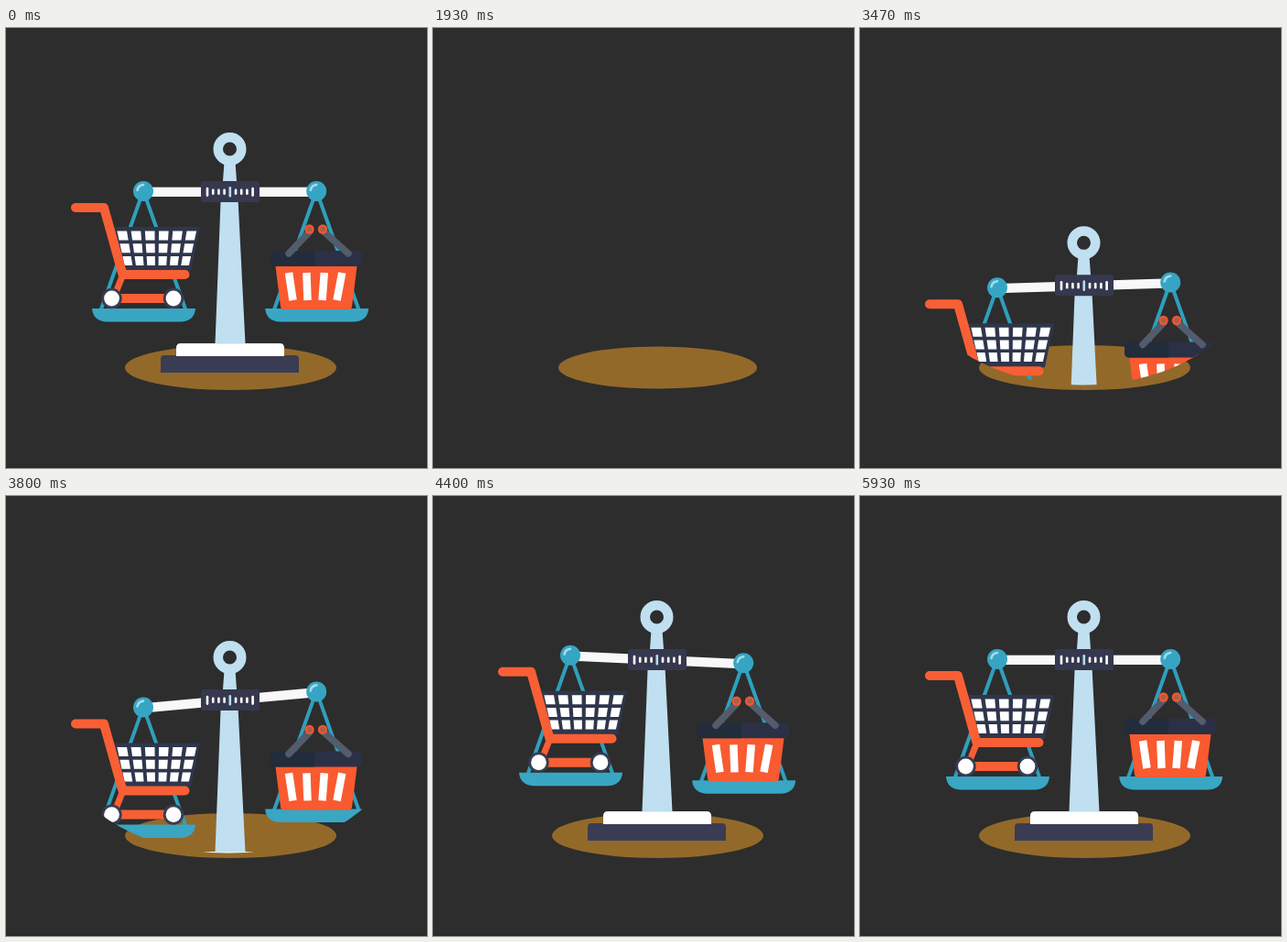
Write an HTML page that moves like this. It is 460x480 px and loops after 6.07 s.

```html
<!DOCTYPE html>
<html lang="en">
<head>
<meta charset="utf-8">
<title>Balance scale</title>
<style>
  html, body { margin: 0; width: 100%; height: 100%; overflow: hidden; background: #2d2d2d; }
  svg { display: block; width: 460px; height: 480px; }
</style>
</head>
<body>
<svg viewBox="0 0 460 480">
  <defs>
    <clipPath id="floor"><path d="M57 0V264.600A186 125 0 0 0 429 264.600V0Z"/></clipPath>
    <g id="hanger">
      <path d="M147 186L103.500 308M153 186L196.500 308" stroke="#2f9fbc" stroke-width="4"/>
      <path d="M94 306H207Q206 320 190 320.500H111Q95 320 94 306Z" fill="#39a6c4"/>
      <circle cx="150" cy="178" r="11" fill="#36a5c3"/>
      <path d="M143.500 177Q144.500 171.500 150 171" fill="none" stroke="#a5dbe8" stroke-width="2.600" stroke-linecap="round"/>
    </g>
    <g id="wheel">
      <circle r="11.200" fill="#383c52"/>
      <circle r="8.400" fill="#fff"/>
    </g>
    <g id="rivet">
      <circle r="5.200" fill="#f0562f"/>
      <circle r="2.800" fill="#a5604f"/>
    </g>
  </defs>

  <rect width="460" height="480" fill="#2d2d2d"/>
  <rect y="478" width="460" height="2" fill="#30272b"/>
  <ellipse id="shadow" cx="245.500" cy="370.500" fill="#93692a"/>

  <g clip-path="url(#floor)">
    <g id="scale">
      <path d="M169 376V361Q169 357 173 357H316Q320 357 320 361V376Z" fill="#3a3c54"/>
      <path d="M186 358V349Q186 344 191 344H299Q304 344 304 349V358Z" fill="#fff"/>
      <g fill="#c0dff0">
        <path d="M238.500 146H250.500L252 167L253.700 190L261.500 344.500H228.500L234.500 190L237 167Z"/>
        <circle cx="244.500" cy="132" r="12.750" fill="none" stroke="#c0dff0" stroke-width="10.500"/>
      </g>
      <rect id="beam" x="158" y="173.700" width="174" height="10.300" fill="#f8f8fa"/>
      <rect x="213" y="167" width="64" height="23" rx="2.500" fill="#36384f"/>
      <g id="ticks" stroke-width="2.600" stroke-linecap="round"></g>

      <g id="left">
        <use href="#hanger"/>
        <path d="M117 217H212L202 265H129Z" fill="#2f364c"/>
        <g id="cells" fill="#fff"></g>
        <path d="M127 271L119 291" stroke="#f95f35" stroke-width="7"/>
        <path d="M76 196H107L127.500 269H195.500" fill="none" stroke="#f95f35" stroke-width="10" stroke-linecap="round" stroke-linejoin="round"/>
        <path d="M122 295H178" stroke="#f95f35" stroke-width="10"/>
        <use href="#wheel" x="115.500" y="295"/>
        <use href="#wheel" x="183" y="295"/>
      </g>

      <g id="right">
        <use href="#hanger" x="189.200"/>
        <path d="M294 256H384L378 304Q377.500 307 374 307H304Q300.500 307 300 304Z" fill="#f95a30"/>
        <g id="slots" stroke="#fff" stroke-width="8.500"></g>
        <rect x="289" y="243" width="100" height="17" rx="5" fill="#2b3046"/>
        <path d="M337 243H294Q289 243 289 248V255Q289 260 294 260H337Z" fill="#222c3a"/>
        <path d="M309 246L332 222M374 246L347 222" stroke="#525c6b" stroke-width="7.500" stroke-linecap="round"/>
        <use href="#rivet" x="331.500" y="219.500"/>
        <use href="#rivet" x="346" y="219.500"/>
      </g>
    </g>
  </g>
</svg>
<script>
  const LOOP = 6070, STEP = 200 / 3;
  const $ = id => document.getElementById(id);

  function add(parent, tag, attrs) {
    const el = document.createElementNS('http://www.w3.org/2000/svg', tag);
    for (const key in attrs) el.setAttribute(key, attrs[key]);
    $(parent).append(el);
  }

  // Gauge marks: tall at both ends and in the middle
  for (let i = 0; i < 9; i++) {
    const x = 220 + i * 6.2;
    const half = i === 4 ? 4.5 : i % 8 === 0 ? 3.8 : 2;
    add('ticks', 'path', {
      d: `M${x} ${178.8 - half}V${178.8 + half}`,
      stroke: i === 4 ? '#b5dcee' : '#fff'
    });
  }

  // Cart mesh: six tapering columns in three rows
  const meshX = (u, y) => {
    const a = 121.5 + (y - 222) * 0.22, b = 208 - (y - 222) * 0.22;
    return a + (b - a) * u;
  };
  for (let row = 0; row < 3; row++) {
    const top = 221.5 + row * 13.7, bottom = top + 10;
    for (let col = 0; col < 6; col++) {
      const u = col / 5.7, v = u + 0.7 / 5.7;
      add('cells', 'path', {
        d: `M${meshX(u, top)} ${top}H${meshX(v, top)}L${meshX(v, bottom)} ${bottom}H${meshX(u, bottom)}Z`
      });
    }
  }

  for (let i = 0; i < 4; i++) {
    add('slots', 'path', { d: `M${309 + i * 19.4} 267L${313.5 + i * 16} 297` });
  }

  // Time in ms, tilt in degrees (positive lowers the right side)
  const SWING = [[2350, -4], [3050, 4.8], [3750, -5.3], [4450, 2.7], [5070, -1.5], [5670, 0]];

  function tiltAt(t) {
    if (t <= SWING[0][0]) return SWING[0][1];
    for (let i = 1; i < SWING.length; i++) {
      const [t0, a] = SWING[i - 1], [t1, b] = SWING[i];
      if (t < t1) return a + (b - a) * (1 - Math.cos(Math.PI * (t - t0) / (t1 - t0))) / 2;
    }
    return 0;
  }

  function draw(now) {
    let step = Math.floor((now % LOOP) / STEP + 0.06);
    // The loop opens on the settled pose, then cuts to empty
    if (step === 0) step = 91;
    const t = step * STEP;

    const size = Math.max(0, Math.min(1, (step - 0.58) / 30.25));
    $('shadow').setAttribute('rx', 115.5 * size);
    $('shadow').setAttribute('ry', 24.5 * size);

    const sink = Math.max(0, 44 - (step - 57) * 11.667);
    const tilt = tiltAt(t);
    const dip = 94.7 * Math.sin(tilt * Math.PI / 180);
    $('scale').setAttribute('visibility', step < 37 ? 'hidden' : 'visible');
    $('scale').setAttribute('transform', `translate(0 ${sink})`);
    $('beam').setAttribute('transform', `rotate(${tilt} 244.8 178.8)`);
    $('left').setAttribute('transform', `translate(0 ${-dip})`);
    $('right').setAttribute('transform', `translate(0 ${dip})`);
  }

  const start = performance.now();
  function tick() {
    draw(performance.now() - start);
    requestAnimationFrame(tick);
  }
  tick();
</script>
</body>
</html>
```
